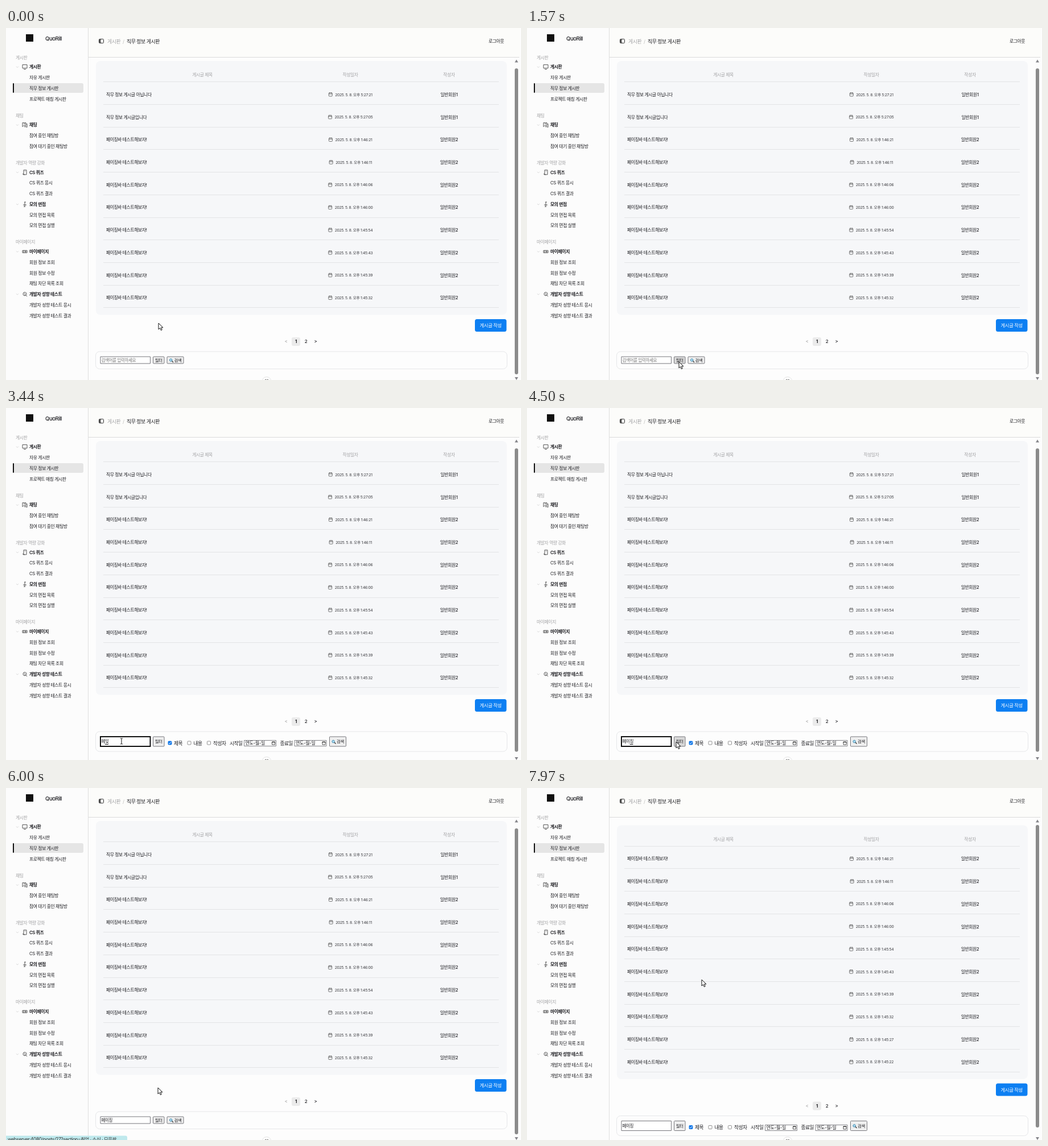
Animation of 905x619 px, one loop 8 s. Source, as an HTML page with a canvas:

```html
<!DOCTYPE html>
<html lang="ko">
<head>
<meta charset="utf-8">
<style>
html, body { margin: 0; width: 100%; height: 100%; overflow: hidden; background: #fdfdfd; }
canvas { display: block; }
</style>
</head>
<body>
<canvas id="stage" width="905" height="619"></canvas>
<script>
const ctx = document.getElementById('stage').getContext('2d');
const LOOP = 8000;
const FONT = 'Inter, "Noto Sans CJK KR", "Noto Sans CJK", sans-serif';
const INK = '#1c1c20', MUTED = '#a3a3a5', LINE = '#e3e4e6';

// Moments of the hard changes, in ms
const OPEN_1 = 1750, FOCUS = 2330, BLUR = 4530, CLOSE = 4580;
const LINK_ON = 5350, LINK_OFF = 6200, OPEN_2 = 6720, RESULT = 7540;

const TYPING = [[2750, 'ㅍ'], [2900, '페'], [3060, '펭'], [3200, '페이'],
  [3360, '페잊'], [3500, '페이지'], [3680, '페이징']];

const POINTER = [[0, 268, 519], [200, 268, 519], [700, 267, 587], [1780, 267, 587],
  [2250, 203, 586], [4150, 203, 586], [4450, 262, 587], [4640, 262, 587],
  [5350, 285, 445], [5950, 267, 527], [6080, 267, 527], [6500, 267, 587],
  [6750, 267, 587], [7040, 413, 597], [7320, 583, 588], [7560, 583, 588], [7960, 307, 337]];

const MENU = [
  ['게시판', 52, ['*게시판', '자유 게시판', '직무 정보 게시판', '프로젝트 매칭 게시판']],
  ['채팅', 154, ['*채팅', '참여 중인 채팅방', '참여 대기 중인 채팅방']],
  ['개발자 역량 강화', 237.2, ['*CS 퀴즈', 'CS 퀴즈 응시', 'CS 퀴즈 결과',
    '*모의 면접', '모의 면접 목록', '모의 면접 실행']],
  ['마이페이지', 376.6, ['*마이페이지', '회원 정보 조회', '회원 정보 수정', '채팅 차단 목록 조회',
    '*개발자 성향 테스트', '개발자 성향 테스트 응시', '개발자 성향 테스트 결과']]
];

const ICONS = {
  '게시판': 'M-4 -4H4V2H-4ZM-2 4H2',
  '채팅': 'M-4 -4H2V1H-2L-4 3ZM3 -2H4V4L2 3H-1M-2 -2H1',
  'CS 퀴즈': 'M-2 -4H3V4H-2ZM-3 2V4H0M0 -2H1',
  '모의 면접': 'M-1 -4H2M0 -4V4M-3 1H3M-2 4H1',
  '마이페이지': 'M-4 -2H4V2H-4ZM-2 -2V2M0 0H3M1 -2V2',
  '개발자 성향 테스트': 'M3 0A3 3 0 1 1 -3 -1A3 3 0 0 1 3 0M-1 -2L1 0L-1 2M2 2L4 4'
};

const TIMES = ['5:27:21', '5:27:05', '1:46:21', '1:46:11', '1:46:06', '1:46:00',
  '1:45:54', '1:45:43', '1:45:39', '1:45:32', '1:45:27', '1:45:22'];
const POSTS = TIMES.map((time, i) => ({
  title: ['직무 정보 게시글 아닙니다', '직무 정보 게시글입니다'][i] || '페이징바 테스트해보자!',
  date: '2025. 5. 8. 오후 ' + time,
  author: i < 2 ? '일반회원1' : '일반회원2'
}));

function setFont(size, weight = 400) {
  ctx.font = `${weight} ${size}px ${FONT}`;
  ctx.letterSpacing = -0.05 * size + 'px';
}

function text(str, x, y, { size = 7.8, weight = 400, color = INK, align = 'left' } = {}) {
  setFont(size, weight);
  ctx.textAlign = align;
  ctx.fillStyle = color;
  ctx.fillText(str, x, y + size * 0.37);
}

function box(x, y, w, h, { r = 0, fill, stroke, width = 1 } = {}) {
  ctx.beginPath();
  ctx.roundRect(x, y, w, h, r);
  if (fill) { ctx.fillStyle = fill; ctx.fill(); }
  if (stroke) { ctx.strokeStyle = stroke; ctx.lineWidth = width; ctx.stroke(); }
}

function shape(path, x, y, { stroke, fill, width = 0.9 } = {}) {
  const p = new Path2D(path);
  ctx.save();
  ctx.translate(x, y);
  if (fill) { ctx.fillStyle = fill; ctx.fill(p); }
  if (stroke) { ctx.strokeStyle = stroke; ctx.lineWidth = width; ctx.stroke(p); }
  ctx.restore();
}

function hline(x, y, w, color = LINE) {
  ctx.fillStyle = color;
  ctx.fillRect(x, Math.round(y), w, 1);
}

function drawSidebar() {
  box(0, 0, 144, 619, { fill: '#fcfcfc' });
  box(144, 0, 1, 619, { fill: '#dedede' });
  box(35, 11, 13, 13, { fill: '#111' });
  text('QuoRill', 69, 18, { size: 9.6, weight: 500 });
  box(13, 97, 123, 17, { r: 3, fill: '#e5e5e5' });
  box(12, 97, 2, 17, { r: 1, fill: '#111' });
  for (const [label, top, items] of MENU) {
    text(label, 17, top, { color: MUTED });
    items.forEach((item, i) => {
      const y = top + 16.6 + i * 18.75;
      const heading = item[0] === '*';
      const name = item.replace('*', '');
      text(name, 41, y, { weight: heading ? 600 : 400 });
      if (!heading) return;
      shape('M-2 -1L0 1L2 -1', 20, y, { stroke: '#c9c9c9', width: 0.7 });
      shape(ICONS[name], 33, y, { stroke: '#444' });
    });
  }
}

function drawHeader() {
  box(145, 0, 758, 51, { fill: '#fcfcfa' });
  hline(145, 51, 757, '#dadada');
  box(163.5, 19.5, 8, 7, { r: 1, stroke: '#333' });
  box(164, 20, 2.5, 6, { fill: '#555' });
  text('게시판', 178, 23.5, { size: 8.9, color: MUTED });
  text('/', 205, 23.5, { size: 8.5, color: '#bbb' });
  text('직무 정보 게시판', 212, 23.5, { size: 8.9, weight: 500 });
  text('로그아웃', 848, 23.5, { weight: 500 });
}

function drawTable(posts, dy) {
  box(158, 58 + dy, 722, 446.5, { r: 8, fill: '#f6f7f9' });
  [['게시글 제목', 345], ['작성일자', 605], ['작성자', 778.5]].forEach(([label, x]) =>
    text(label, x, 82.5 + dy, { color: MUTED, align: 'center' }));
  hline(171, 94 + dy, 695);
  posts.forEach(({ title, date, author }, i) => {
    const y = 117 + dy + i * 39.72;
    text(title, 176, y, { weight: 500 });
    setFont(6.8);
    const left = 605 - (ctx.measureText(date).width + 12) / 2;
    box(left + 1, y - 3, 6, 6, { r: 1, stroke: '#555', width: 0.8 });
    shape('M1 -1H7M2.5 -4V-2M5.5 -4V-2', left, y, { stroke: '#555', width: 0.8 });
    text(date, left + 12, y, { size: 6.8, color: '#3c3c40' });
    text(author, 778.5, y, { weight: 500, align: 'center' });
    hline(171, y + 16.9, 695);
  });
}

function drawPager(dy) {
  box(824, 512 + dy, 55.5, 22, { r: 3.5, fill: '#0d7ff2' });
  text('게시글 작성', 851.7, 523 + dy, { size: 8.4, weight: 500, color: '#fff', align: 'center' });
  box(502, 544 + dy, 15, 15, { r: 3, fill: '#ebebeb' });
  [['<', 492, '#aaa'], ['1', 509.5, INK], ['2', 527, INK], ['>', 544, INK]].forEach(([s, x, color]) =>
    text(s, x, 551.5 + dy, { size: 8, weight: s === '1' ? 700 : 500, color, align: 'center' }));
}

function drawButton(x, y, w, h, label, hovered, labelX) {
  box(x + .5, y + .5, w - 1, h - 1, { r: 1, fill: hovered ? '#d9d9d9' : '#efefef', stroke: '#77777c' });
  text(label, labelX, y + h / 2, { size: 7.4, align: 'center' });
}

function drawCheckbox(x, y, checked) {
  box(x - 3, y - 3, 6, 6, { r: 1, fill: checked ? '#0b74e8' : '#fff', stroke: checked ? '#0b74e8' : '#767676', width: 0.8 });
  if (checked) shape('M-2 0L-.5 1.6L2 -1.6', x, y, { stroke: '#fff', width: 1 });
}

function drawDateField(x, y) {
  box(x + .5, y - 4.5, 56, 10, { fill: '#fff', stroke: '#77777c', width: 0.9 });
  text('연도-월-일', x + 2.5, y + .5, { size: 8 });
  box(x + 49.5, y - 2, 5, 5, { stroke: '#222', width: 0.8 });
  hline(x + 49, y - 2, 6, '#222');
}

function drawSearch({ open, focused, value, typing, hover, dy }) {
  const height = open ? 18 : 13;
  const top = 577.5 + dy;
  const middle = top + height / 2;
  box(157.5, 569 + dy, 723, open ? 35 : 30.5, { r: 7, fill: '#fdfdfd', stroke: '#e6e7e9' });

  box(166, top + .5, 87.5, height - 1, { fill: '#fff', stroke: focused ? '#111' : '#77777c', width: focused ? 2 : 1 });
  text(value || '검색어를 입력하세요', 167.5, middle, { size: 7.5, color: value ? INK : '#757575' });
  if (typing && value) {
    setFont(7.5);
    const end = 167.5 + ctx.measureText(value).width;
    hline(end - 6.5, middle + 4, 6, INK);
  }

  drawButton(258, top, 20.5, height, '필터', hover === 'filter', 268.2);
  const searchX = open ? 568 : 282.5;
  drawButton(searchX, top, 30, height, '검색', hover === 'search', searchX + 19.5);
  shape('M2 0A2.3 2.3 0 1 1 2 -.1Z', searchX + 7.5, middle, { fill: '#a9d8ee', stroke: '#2f7fa8' });
  shape('M1.5 1.5L4 4', searchX + 7.5, middle, { stroke: '#333', width: 1.3 });

  if (!open) return;
  const y = 589.3 + dy;
  [['제목', 288, 295], ['내용', 322, 329.5], ['작성자', 356.5, 364]].forEach(([label, x, labelX], i) => {
    drawCheckbox(x, y - .3, i === 0);
    text(label, labelX, y, { size: 8.7 });
  });
  [['시작일', 393, 418], ['종료일', 481.5, 506.5]].forEach(([label, x, fieldX]) => {
    text(label, x, y, { size: 8.7 });
    drawDateField(fieldX, Math.round(y));
  });
}

function drawScrollbar(top, bottom) {
  box(893, 52, 10, 567, { fill: '#fcfcfc' });
  box(894, top, 6, bottom - top, { r: 3, fill: '#8b8b8b' });
  shape('M-3 2.5L0 -2.5L3 2.5Z', 897, 58, { fill: '#85858a' });
  shape('M-3 -2.5L0 2.5L3 -2.5Z', 897, 616.5, { fill: '#85858a' });
}

function drawBottomHandle() {
  box(450, 613.5, 16, 16, { r: 8, fill: '#fff', stroke: '#e4e4e4' });
  box(455, 618, 2.5, 1, { fill: '#777' });
  box(458.5, 618, 2.5, 1, { fill: '#777' });
}

function drawLinkHint() {
  box(-4, 611.5, 217, 20, { r: 3, fill: '#bfe9ed' });
  text('webserver:4080/posts/27?section=취업 · 소식 · 모음판', 3, 618, { size: 8.4, color: '#333' });
}

function pointerAt(t) {
  const next = POINTER.findIndex(p => p[0] > t);
  if (next < 0) return POINTER.at(-1).slice(1);
  const [t0, x0, y0] = POINTER[next - 1], [t1, x1, y1] = POINTER[next];
  const u = (t - t0) / (t1 - t0), e = u * u * (3 - 2 * u);
  return [x0 + (x1 - x0) * e, y0 + (y1 - y0) * e];
}

function drawPointer(x, y, overInput) {
  if (overInput) {
    shape('M-2 -5H-.6L0 -4.4L.6 -5H2M0 -4.5V4.5M-2 5H-.6L0 4.4L.6 5H2', x, y, { stroke: '#111', width: 1 });
  } else {
    shape('M0 0V11L2.6 8.6L4.3 12.6L6.2 11.8L4.5 7.9H8Z', x, y, { fill: '#fff', stroke: '#111', width: 1 });
  }
}

function draw(t) {
  const done = t >= RESULT;
  const open = (t >= OPEN_1 && t < CLOSE) || t >= OPEN_2;
  const focused = t >= FOCUS && t < BLUR;
  const dy = done ? 7.5 : 0;
  const [x, y] = pointerAt(t);
  const onForm = y > 577 + dy && y < 577 + dy + (open ? 18 : 13);
  const overInput = onForm && x > 166 && x < 254;
  const searchX = open ? 568 : 283;
  const hover = !onForm ? '' : x > 258 && x < 278 ? 'filter' : x > searchX && x < searchX + 30 ? 'search' : '';
  const value = TYPING.filter(([at]) => t >= at).at(-1)?.[1] || '';

  ctx.fillStyle = '#fdfdfd';
  ctx.fillRect(0, 0, 905, 619);
  drawTable(done ? POSTS.slice(2) : POSTS.slice(0, 10), dy);
  drawPager(dy);
  drawSearch({ open, focused, value, typing: focused, hover, dy });
  drawHeader();
  drawSidebar();
  if (done) drawScrollbar(65, 597);
  else drawScrollbar(71, open ? 604.5 : 609);
  drawBottomHandle();
  if (t >= LINK_ON && t < LINK_OFF) drawLinkHint();
  drawPointer(x, y, overInput);
}

function tick() {
  draw(performance.now() % LOOP);
  requestAnimationFrame(tick);
}
tick();
</script>
</body>
</html>
```
